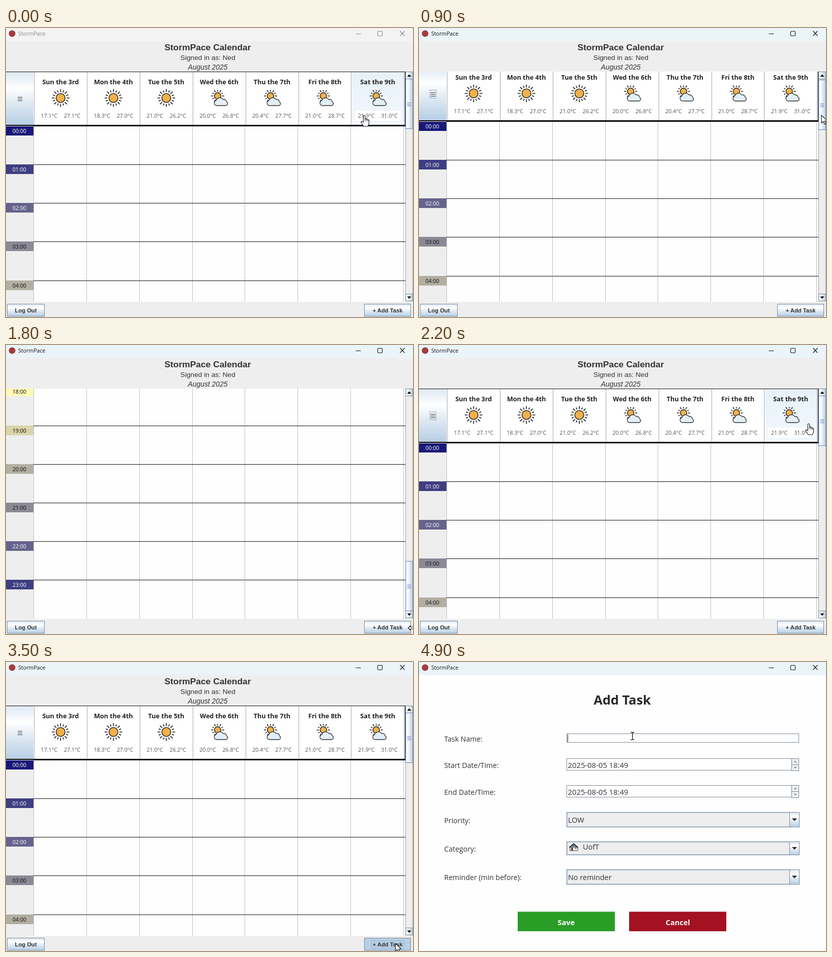
Animation of 800x570 px, one loop 5000 ms. Source, as an HTML page:

```html
<!DOCTYPE html>
<html lang="en">
<head>
<meta charset="utf-8">
<title>StormPace</title>
<style>
html, body { margin: 0; width: 100%; height: 100%; overflow: hidden; background: #eee; }
svg { display: block; width: 800px; height: 570px; }
text { white-space: pre; }
.ui { font-family: "Open Sans", "Noto Sans", sans-serif; }
.ar { font-family: "Liberation Sans", Arial, sans-serif; }
.b { font-weight: 700; }
.m { text-anchor: middle; }
</style>
</head>
<body>
<svg id="stage" viewBox="0 0 800 570" xmlns="http://www.w3.org/2000/svg"></svg>
<script>
const EDGE = '#7a8a99', INK = '#333';

const rect = (x, y, w, h, fill, more = '') =>
  `<rect x="${x}" y="${y}" width="${w}" height="${h}" fill="${fill}" ${more}/>`;
const box = (x, y, w, h, fill, stroke = EDGE, more = '') =>
  rect(x + .5, y + .5, w - 1, h - 1, fill, `stroke="${stroke}" ${more}`);
const text = (s, x, y, size, cls = 'ui', fill = INK, more = '') =>
  `<text x="${x}" y="${y}" font-size="${size}" class="${cls}" fill="${fill}" ${more}>${s}</text>`;
const path = (d, more = '') => `<path d="${d}" ${more}/>`;
const group = (id, body, more = '') => `<g id="${id}" ${more}>${body}</g>`;

const steel = (id, x2, y2) => `<linearGradient id="${id}" x2="${x2}" y2="${y2}">
  <stop stop-color="#dde8f3"/><stop offset=".3" stop-color="#fff"/>
  <stop offset=".6" stop-color="#dde8f3"/><stop offset="1" stop-color="#b8cfe5"/></linearGradient>`;

const defs = `<defs>${steel('down', 0, 1)}${steel('across', 1, 0)}
  <linearGradient id="hover" x2="0" y2="1"><stop stop-color="#e8f1fa"/><stop offset="1" stop-color="#f3f8fd"/></linearGradient>
  <clipPath id="view">${rect(0, 86, 785, 454, '#000')}</clipPath></defs>`;

// Weather icons
function rays(cx, cy, from, to, n, keep = () => true) {
  let d = '';
  for (let i = 0; i < n; i++) {
    if (!keep(i)) continue;
    const a = i * 2 * Math.PI / n, end = i % 2 ? to - 1.5 : to;
    const at = r => `${(cx + r * Math.cos(a)).toFixed(1)} ${(cy + r * Math.sin(a)).toFixed(1)}`;
    d += `M${at(from)}L${at(end)}`;
  }
  return path(d, 'stroke="#222" stroke-width="1.7"');
}
const disc = (x, y, r) =>
  `<circle cx="${x}" cy="${y}" r="${r}" fill="#f2b04a" stroke="#222" stroke-width="1.5"/>`;
const sun = x => rays(x, 138, 11.8, 17.5, 16) + disc(x, 138, 8.8);
const cloudy = x => rays(x - 3, 134, 8.8, 13, 12, i => i < 1 || i > 3) + disc(x - 3, 134, 6.4) +
  path(`M${x - 5} 153a5 5 0 0 1 -1 -9.8a7.5 7.5 0 0 1 13.5 -2.2a5.5 5.5 0 0 1 7 4.5a4 4 0 0 1 -1.5 7.5z`,
    'fill="#e3eff7" stroke="#333" stroke-width="1.3"');

// Calendar sheet
const days = [
  ['Sun the 3rd', '17.1', '27.1'], ['Mon the 4th', '18.3', '27.0'], ['Tue the 5th', '21.0', '26.2'],
  ['Wed the 6th', '20.0', '26.8'], ['Thu the 7th', '20.4', '27.7'], ['Fri the 8th', '21.0', '28.7'],
  ['Sat the 9th', '21.9', '31.0']
];

function header() {
  let s = rect(0, 86, 785, 107, '#fff') + rect(0, 87, 54, 104, 'url(#down)') +
    path('M23 136.5h9M23 140h9M23 143.5h9', 'stroke="#333"') +
    box(21, 131, 13, 17, 'none', '#99a9b9', 'id="focus"') +
    group('glow', rect(680, 87, 103, 104, 'url(#hover)') + rect(686, 163, 89, 20, '#fff', 'rx="3"'));
  days.forEach(([name, low, high], i) => {
    const x = 107.3 + i * 103.9;
    s += text(name, x, 110.5, 12.6, 'ui b m', '#222') + (i < 3 ? sun(x) : cloudy(x)) +
      text(low + '°C', x - 22.5, 177, 10.7, 'ui m', '#555') +
      text(high + '°C', x + 22.7, 177, 10.7, 'ui m', '#555');
  });
  for (let i = 0; i < 8; i++) s += rect(Math.round(55 + i * 103.9), 87, 1, 105, '#a8a8ae');
  return s + rect(0, 86, 785, 1, '#111') + rect(0, 191, 785, 2, '#000') + rect(784, 86, 1, 107, '#111');
}

const NIGHT = [24, 24, 120], DAWN = [255, 249, 180], NOON = [255, 255, 255];
function shade(hour) {
  const h = hour > 12 ? 24 - hour : hour;
  const [a, b] = h < 6 ? [NIGHT, DAWN] : [DAWN, NOON];
  return `rgb(${a.map((v, i) => Math.round(v + (b[i] - v) * (h % 6) / 6 * (h < 12) + (h === 12 ? b[i] - v : 0)))})`;
}

function hours() {
  let s = rect(54, 192, 731, 1830, '#fefefe');
  for (let i = 0; i < 8; i++) s += rect(Math.round(54 + i * 103.85), 193, 1, 1830, '#bfbfc4');
  for (let h = 0; h < 24; h++) {
    const y = Math.round(192.8 + h * 76.2);
    s += rect(54, y, 731, 1, '#111') + rect(0, y + (h ? 0 : 1), 54, h ? 19 : 18, shade(h)) +
      text(String(h).padStart(2, '0') + ':00', 26.3, y + 13.8, 10.6, 'ui m', h < 3 || h > 21 ? '#fff' : '#111');
  }
  return s;
}

const button = (x, y, w, h, label, id) =>
  box(x, y, w, h, 'url(#down)', EDGE, id ? `id="${id}"` : '') +
  text(label, x + w / 2, y + 17.4, 11.2, 'ar b m');

const scrollbar = rect(785, 86, 15, 454, '#eee') + box(785, 86, 15, 453, '#eee', '#9aa5b0') +
  box(785, 86, 15, 15, 'url(#across)') + path('M788.5 96h8l-4 -4.5z') +
  box(785, 524, 15, 15, 'url(#across)') + path('M788.5 529.5h8l-4 4.5z') +
  group('thumb', box(785, 0, 15, 99, 'url(#across)', '#6382bf') +
    path('M788.5 47.5h8M788.5 50.5h8M788.5 53.5h8', 'stroke="#6382bf"'));

const calendar = rect(0, 26, 800, 544, '#eee') +
  text('StormPace Calendar', 396.5, 44, 17.4, 'ar b m') +
  text('Signed in as: Ned', 396.8, 63, 13.7, 'ar m') +
  text('August 2025', 396.5, 82, 13.9, 'ar m', INK, 'font-style="italic"') +
  `<g clip-path="url(#view)">${group('sheet', hours() + header())}</g>` +
  scrollbar + rect(0, 540, 800, 30, '#eee') +
  button(2, 544, 74, 25, 'Log Out') + button(704, 544, 92, 25, '+ Add Task', 'add') +
  box(718, 549, 64, 16, 'none', '#99b3d0', 'id="ring"');

// Task form
const spinner = y => box(290, y, 443, 24, '#fff') +
  [0, 12].map(d => box(732, y + d, 15, 13, '#eee')).join('') +
  path(`M737 ${y + 8}h5l-2.5 -3zM737 ${y + 17}h5l-2.5 3z`, 'fill="#777"') +
  text('2025-08-05 18:49', 292.5, y + 18.8, 14.8);
const combo = (y, h, label, x = 293, drop = 20.6) =>
  box(290, y, 458, h, '#eee') + rect(291.5, y + 1.5, 455, h - 3, 'none', 'stroke="#b8cfe5"') +
  box(728, y, 20, h, 'url(#down)') +
  path(`M733 ${y + h / 2 - 2.5}h10l-5 5z`, 'fill="#222"') + text(label, x, y + drop, 14.4);
const house = path('M297 365h15v7h-15z', 'fill="#fff" stroke="#333"') +
  path('M295.5 366l8.5 -7.5l8.5 7.5', 'fill="#7d8790" stroke="#222" stroke-width="1.8"') +
  rect(299, 366, 4, 6, '#7a4b2c') + rect(306, 366, 4, 3, '#6d9cc4');

const labels = [['Task Name:', 157], ['Start Date/Time:', 208.5], ['End Date/Time:', 262],
  ['Priority:', 317.5], ['Category:', 373.5], ['Reminder (min before):', 430]];
const form = rect(0, 26, 800, 544, '#fefefe') + text('Add Task', 399.5, 83.5, 25.4, 'ui b m', '#2a2a2a') +
  labels.map(([s, y]) => text(s, 49.5, y, 14.1)).join('') +
  box(290, 141, 457, 18, '#fff') + rect(292, 143, 1, 15, '#222', 'id="caret"') +
  spinner(190) + spinner(243) +
  combo(296, 30, 'LOW') + combo(354, 27, 'UofT', 322, 16) + house + combo(409, 30, 'No reminder') +
  rect(194, 492.5, 191, 38.5, '#2a9d27') + text('Save', 289.3, 518.7, 14.6, 'ui b m', '#fff') +
  rect(413, 492.5, 191, 38.5, '#a41121') + text('Cancel', 508.7, 518.7, 14.5, 'ui b m', '#fff');

const titlebar = rect(0, 0, 800, 26, '#f3f3f3', 'id="bar"') +
  '<circle cx="12" cy="11" r="6.5" fill="#a33b3f"/>' +
  group('caption', text('StormPace', 24, 15.2, 10.6, 'ui', 'currentColor') +
    path('M687.5 11.5h10M774.5 6l9 9.500M783.5 6l-9 9.500', 'stroke="currentColor" stroke-width="1.1"') +
    rect(730.5, 6.5, 9, 9, 'none', 'rx="1.5" stroke="currentColor" stroke-width="1.1"'));

// Pointers, each with its hot spot at 0,0
const line = 'fill="#fff" stroke="#111" stroke-width="1.1" stroke-linejoin="round"';
const pointers = {
  arrow: path('M0 0V15.500L3.600 12.200L6 17.800L8.600 16.700L6.200 11.200H11.200Z', line),
  hand: path('M-1.700 1.500Q0 -1.500 1.700 1.500V7Q3.500 6 4.600 7.700Q6.300 7 7.300 8.700Q9.500 8.500 9.500 11V16Q9 19 7 22H-1Q-3 18 -6 14.500Q-6.500 11.500 -3.500 12.500L-1.700 14Z', line) +
    path('M1.700 7v4M4.600 8v3.500M7.300 9v3', 'stroke="#111" fill="none"'),
  beam: path('M-3.500 -7.500Q0 -7.500 0 -6Q0 -7.500 3.500 -7.500M0 -6.500V6.500M-3.500 7.500Q0 7.500 0 6Q0 7.500 3.500 7.500', 'stroke="#111" stroke-width="1.3" fill="none"'),
  sizer: path('M-9.500 0L-5 -4.500V-1.800H5V-4.500L9.500 0L5 4.500V1.800H-5V4.500Z', line)
};

document.getElementById('stage').innerHTML = defs + group('calendar', calendar) + group('form', form) +
  titlebar + group('pointer', Object.entries(pointers).map(([id, d]) => group(id, d)).join(''));

const $ = id => document.getElementById(id);
const show = (id, on) => $(id).setAttribute('display', on ? 'inline' : 'none');
const move = (id, x, y) => $(id).setAttribute('transform', `translate(${x} ${y})`);
const clamp = (v, a, b) => Math.min(b, Math.max(a, v));

// Pointer stops: time, x, y
const stops = [
  [0, 704, 172], [200, 712, 171], [500, 790, 168], [800, 790.5, 170], [900, 791, 172], [1000, 795, 215],
  [1300, 803.5, 387], [1500, 803, 480], [1800, 800, 558], [1900, 798, 480], [2100, 790, 165],
  [2200, 766, 155], [2400, 768, 162], [2600, 770, 235], [2900, 766, 535], [3100, 765.5, 555],
  [3600, 765.5, 555], [3800, 745, 515], [4200, 470, 185], [4500, 420, 146], [5000, 419.5, 146]
];
function pointerAt(t) {
  const i = stops.findIndex(s => s[0] > t), a = stops[i - 1], b = stops[i];
  const k = (t - a[0]) / (b[0] - a[0]);
  return [a[1] + (b[1] - a[1]) * k, a[2] + (b[2] - a[2]) * k];
}

const inside = (x, y, l, t, r, b) => x > l && x < r && y > t && y < b;

function draw(t) {
  const [x, y] = pointerAt(t);
  const active = t >= 600, editing = t >= 3600, pressed = t >= 3400 && !editing;
  const drag = t >= 800 && t < 2200;
  const thumb = drag ? Math.round(clamp(y - 70, 100, 426)) : 100;

  show('calendar', !editing);
  show('form', editing);
  move('thumb', 0, thumb);
  move('sheet', 0, -Math.round((thumb - 100) * 4.546));
  $('bar').setAttribute('fill', active ? '#ebf4f9' : '#f3f3f3');
  $('caption').style.color = active ? '#111' : '#888';
  show('focus', active && !pressed);
  $('add').setAttribute('fill', pressed ? '#b8cfe5' : 'url(#down)');
  show('ring', pressed);
  show('caret', t >= 4500);

  const onDay = !editing && !drag && inside(x, y, 55, 87, 784, 192);
  show('glow', onDay && x > 679);
  const onField = editing && (inside(x, y, 290, 141, 747, 159) ||
    inside(x, y, 290, 190, 732, 214) || inside(x, y, 290, 243, 732, 267));
  const kind = onDay ? 'hand' : onField ? 'beam' : x >= 797 ? 'sizer' : 'arrow';
  for (const id in pointers) show(id, id === kind);
  move('pointer', x, y);
}

const start = performance.now();
function tick() {
  const t = (performance.now() - start) % 5000;
  draw(Math.floor(t / 100) * 100);
  requestAnimationFrame(tick);
}
tick();
</script>
</body>
</html>
```
